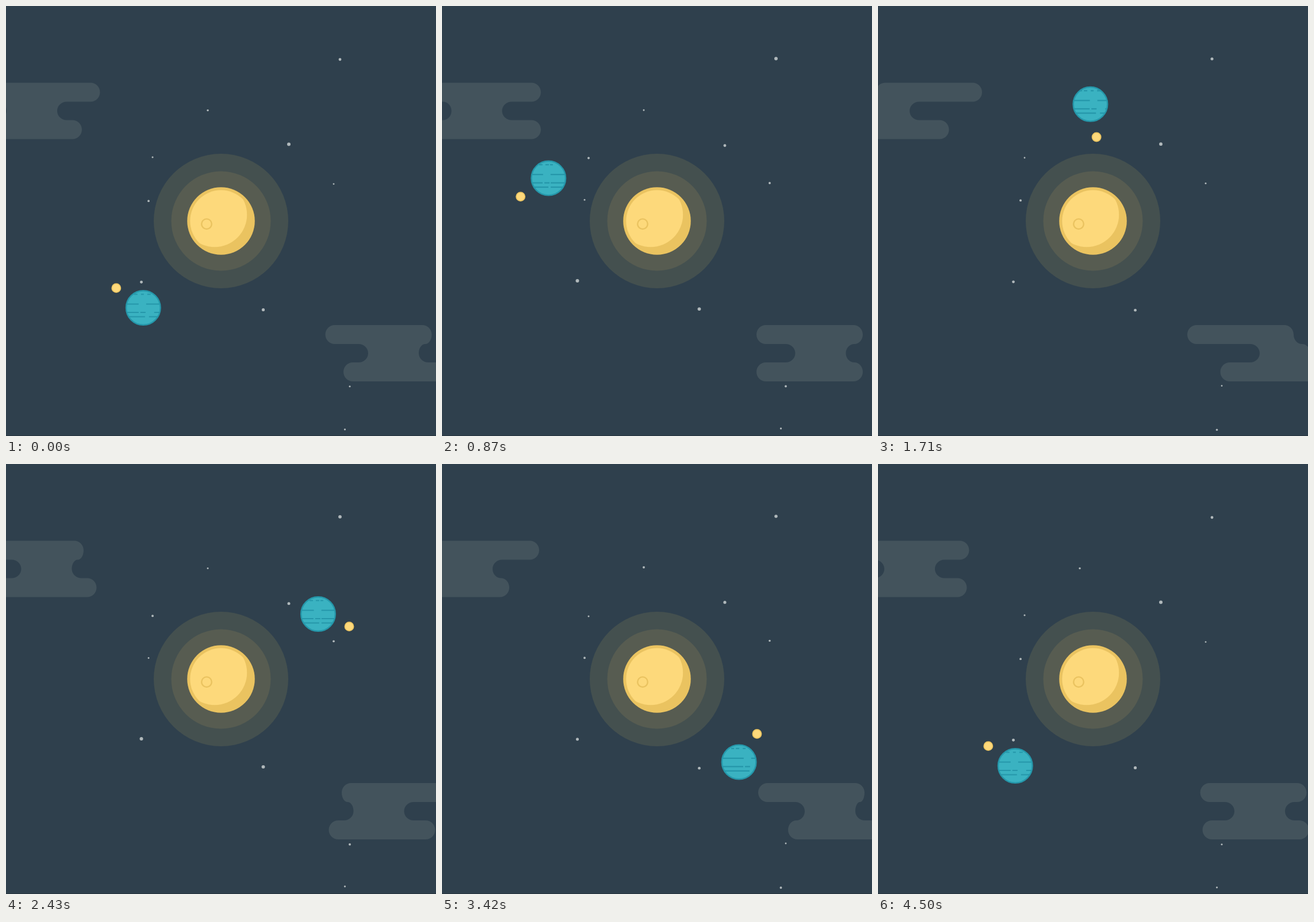
Animation of 748 by 748 pixels, one loop 4530 ms. Source, as an HTML page with a canvas:

```html
<!DOCTYPE html>
<html lang="en">
<head>
<meta charset="utf-8">
<title>Orbit</title>
<style>
html, body { margin: 0; height: 100%; overflow: hidden; background: #2f404d; }
canvas { display: block; width: 100vw; height: 100vh; }
</style>
</head>
<body>
<canvas id="stage" width="748" height="748"></canvas>
<script>
const ctx = document.getElementById('stage').getContext('2d');
const LOOP = 4530, FRAME = 30, TURN = 4500;
const SUN = 374, TAU = Math.PI * 2, RAD = Math.PI / 180;
const GOLD = '#eac360', PALE = '#fdd97b', TEAL = '#3ab2c1', DEEP = '#2597aa';

const random = seed => {
  const n = Math.sin(seed * 12.9898) * 43758.5453;
  return n - Math.floor(n);
};

// Eases through a few poses set at the given times.
const POSES = [0, 870, 1710, 2430, 3420, 3960, 4500];
const drift = (values, t) => {
  const i = Math.max(0, POSES.findLastIndex(start => start < t));
  const u = (t - POSES[i]) / (POSES[i + 1] - POSES[i]);
  return values[i] + (values[i + 1] - values[i]) * (1 - Math.cos(Math.PI * u)) / 2;
};

const BIG_STARS = [[581, 92], [492, 241.5], [235.5, 479], [447.5, 528]];
const SMALL_STARS = [[351, 181], [255, 264], [570, 308.5], [248, 338], [598, 661.3], [589.5, 736]];

// Right ends of the upper bar, the waist and the lower bar
const CLOUD = [
  [163.5, 172, 181, 135, 169, 173, 158.5],
  [89, 104.5, 55, 114.5, 88, 75, 99],
  [132, 172, 123.5, 157.5, 117, 142, 154.5]
];

// Planet bands: height, start, dash pattern
const BANDS = [
  [-23.5, -60, [6, 5, 6, 2, 5, 12, 5, 3, 6, 6, 5, 6, 6, 9]],
  [-6.5, -63.5, [55.5, 13, 44.5, 13]],
  [8, -71, [9, 2, 52, 3, 9, 15, 27, 3]],
  [15.5, -60, [63, 7, 46, 4]]
];

function disc(x, y, r, fill, stroke, width) {
  ctx.beginPath();
  ctx.arc(x, y, r, 0, TAU);
  if (fill) { ctx.fillStyle = fill; ctx.fill(); }
  if (stroke) { ctx.strokeStyle = stroke; ctx.lineWidth = width; ctx.stroke(); }
}

function clipDisc(x, y, r) {
  ctx.beginPath();
  ctx.arc(x, y, r, 0, TAU);
  ctx.clip();
}

function stars(list, radius, t) {
  list.forEach(([x, y], i) => {
    const wave = seed => Math.sin(TAU * (t / 1500 + random(seed + x)));
    disc(x, y + 1.3 * wave(i), radius + 0.3 * wave(i + 0.5), '#b0b8bb');
  });
}

// One uneven end of a cloud; side is 1 for the right end going down, -1 for the left going up.
function cloudEnd(first, waist, last, side) {
  const R = 16.5, K = .5523;
  const fillet = d => Math.max(-R, Math.min(R, d / 2));
  const a = fillet(first - waist), b = fillet(last - waist);
  let x = first - R * side, y = -49 * side;
  ctx.lineTo(x, y);
  const bend = (x1, dy, upright) => {
    const y1 = dy * side;
    if (upright) ctx.bezierCurveTo(x, y + (y1 - y) * K, x1 - (x1 - x) * K, y1, x1, y1);
    else ctx.bezierCurveTo(x + (x1 - x) * K, y, x1, y1 - (y1 - y) * K, x1, y1);
    x = x1; y = y1;
  };
  const run = x1 => ctx.lineTo(x = x1, y);
  bend(first, -32.5);
  bend(first - a, -16, true);
  run(waist + a);
  bend(waist, 0);
  bend(waist + b, 16, true);
  run(last - b);
  bend(last, 32.5);
  bend(last - R * side, 49, true);
}

function cloud(t, x, y, flip) {
  const [top, waist, low] = CLOUD.map(ends => drift(ends, t));
  ctx.save();
  ctx.translate(x, y);
  ctx.scale(flip, 1);
  ctx.beginPath();
  cloudEnd(top, waist, low, 1);
  cloudEnd(low - 185, waist - 88, top - 185, -1);
  ctx.fillStyle = '#43535c';
  ctx.fill();
  ctx.restore();
}

function sun() {
  disc(SUN, SUN, 117, '#44504f');
  disc(SUN, SUN, 86.5, '#575c51');
  disc(SUN, SUN, 58.8, GOLD);
  ctx.save();
  clipDisc(SUN, SUN, 53.7);
  disc(363, 363, 56.2, PALE);
  ctx.restore();
  disc(349, 379.2, 8.8, null, GOLD, 2.4);
}

// The surface spins half a pattern in each slow-then-fast step.
function surface(t) {
  const u = t / 750 % 1;
  const spin = (Math.floor(t / 750) % 2 + .4 * u + .6 * u ** 5) / 2;
  ctx.save();
  clipDisc(0, 0, 29);
  ctx.strokeStyle = DEEP;
  ctx.lineWidth = 2.2;
  for (const [y, start, dashes] of BANDS) {
    const length = dashes.reduce((sum, part) => sum + part);
    const x = start + spin * length;
    ctx.setLineDash(dashes);
    ctx.beginPath();
    ctx.moveTo(x - length, y);
    ctx.lineTo(x + length, y);
    ctx.stroke();
  }
  ctx.restore();
}

function planet(t) {
  const orbit = (131.85 + 360 * t / TURN) * RAD;
  const moon = (216.2 - 360 * t / TURN) * RAD;
  ctx.save();
  ctx.translate(374.2 + 203 * Math.cos(orbit), 373.8 + 203 * Math.sin(orbit));
  disc(58.2 * Math.cos(moon), 58.2 * Math.sin(moon), 7.6, PALE, GOLD, 1.7);
  disc(0, 0, 30, TEAL);
  surface(t);
  disc(0, 0, 29.8, null, DEEP, 2.4);
  ctx.restore();
}

function draw() {
  const t = Math.floor(performance.now() % LOOP / FRAME) * FRAME;
  ctx.fillStyle = '#2f404d';
  ctx.fillRect(0, 0, 748, 748);
  cloud(t, 0, 182.5, 1);
  cloud(t, 719, 604, -1);
  stars(BIG_STARS, 2.7, t);
  stars(SMALL_STARS, 1.7, t);
  sun();
  planet(t);
  ctx.fillStyle = '#26333d';
  ctx.fillRect(0, 747, 748, 1);
  requestAnimationFrame(draw);
}
requestAnimationFrame(draw);
</script>
</body>
</html>
```
